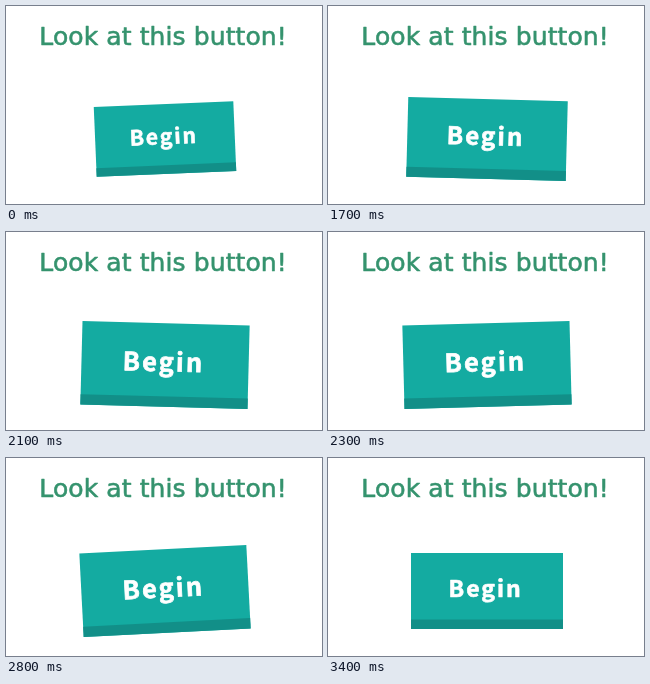
An HTML page with a canvas that plays this animation: 316 by 198 pixels, repeating every 3.5 s.

```html
<!DOCTYPE html>
<html lang="en">
<head>
<meta charset="utf-8">
<title>Look at this button!</title>
<style>
  html, body { margin: 0; width: 100%; height: 100%; overflow: hidden; background: #fff; }
  canvas { display: block; width: 316px; height: 198px; }
</style>
</head>
<body>
<canvas id="stage"></canvas>
<script>
const W = 316, H = 198, LOOP = 3500, HOLD = 1400, STEP = 100;
const canvas = document.getElementById('stage');
const ctx = canvas.getContext('2d');
const ratio = window.devicePixelRatio || 1;
canvas.width = W * ratio;
canvas.height = H * ratio;

// Wobble keys: [percent, scale, degrees]
const keys = [
  [0, 1, 0], [10, 0.9, -3], [20, 0.9, -3],
  [30, 1.1, 3], [40, 1.1, -3], [50, 1.1, 3], [60, 1.1, -3],
  [70, 1.1, 3], [80, 1.1, -3], [90, 1.1, 3], [100, 1, 0]
];

const bezier = (a, b, u) => 3 * (1 - u) * (1 - u) * u * a + 3 * (1 - u) * u * u * b + u * u * u;

// Same curve as the CSS "ease" keyword
function ease(x) {
  let lo = 0, hi = 1;
  for (let i = 0; i < 24; i++) {
    const mid = (lo + hi) / 2;
    if (bezier(0.25, 0.25, mid) < x) lo = mid; else hi = mid;
  }
  return bezier(0.1, 1, lo);
}

// The pose advances in steps of 100 ms, 5 % of the wobble each
function progress(t) {
  if (t < HOLD) return 5.1;
  return Math.min(100, 9.5 + 5 * Math.floor((t - HOLD) / STEP));
}

function pose(p) {
  const i = Math.min(keys.length - 2, Math.floor(p / 10));
  const [start, s0, r0] = keys[i];
  const [, s1, r1] = keys[i + 1];
  const k = ease((p - start) / 10);
  return { scale: s0 + (s1 - s0) * k, angle: (r0 + (r1 - r0) * k) * Math.PI / 180 };
}

// Text with a thin outline of its own colour for extra weight
function drawText(text, x, y, { font, color, spacing, weight }) {
  ctx.font = font;
  ctx.letterSpacing = spacing;
  ctx.fillStyle = ctx.strokeStyle = color;
  ctx.lineWidth = weight;
  ctx.lineJoin = 'round';
  ctx.fillText(text, x, y);
  ctx.strokeText(text, x, y);
}

function drawTitle() {
  drawText('Look at this button!', 33.3, 38.5, {
    font: '25px "DejaVu Sans", sans-serif', color: '#35936e', spacing: '0.1px', weight: 0.6
  });
}

function drawButton({ scale, angle }) {
  ctx.save();
  ctx.filter = `blur(${0.4 * ratio}px)`;
  ctx.translate(159, 133);
  ctx.rotate(angle);
  ctx.scale(scale, scale);
  ctx.fillStyle = '#14aba1';
  ctx.fillRect(-76, -38, 152, 76);
  ctx.fillStyle = '#128f88';
  ctx.fillRect(-76, 28.5, 152, 9.5);
  drawText('Begin', -38.5, 5.7, {
    font: 'bold 23px "Noto Sans CJK JP", "Noto Sans CJK SC", "Open Sans", sans-serif',
    color: '#fff', spacing: '2px', weight: 0.7
  });
  ctx.restore();
}

function frame() {
  const t = performance.now() % LOOP;
  ctx.setTransform(ratio, 0, 0, ratio, 0, 0);
  ctx.fillStyle = '#fff';
  ctx.fillRect(0, 0, W, H);
  drawTitle();
  drawButton(pose(progress(t)));
  requestAnimationFrame(frame);
}
frame();
</script>
</body>
</html>
```
